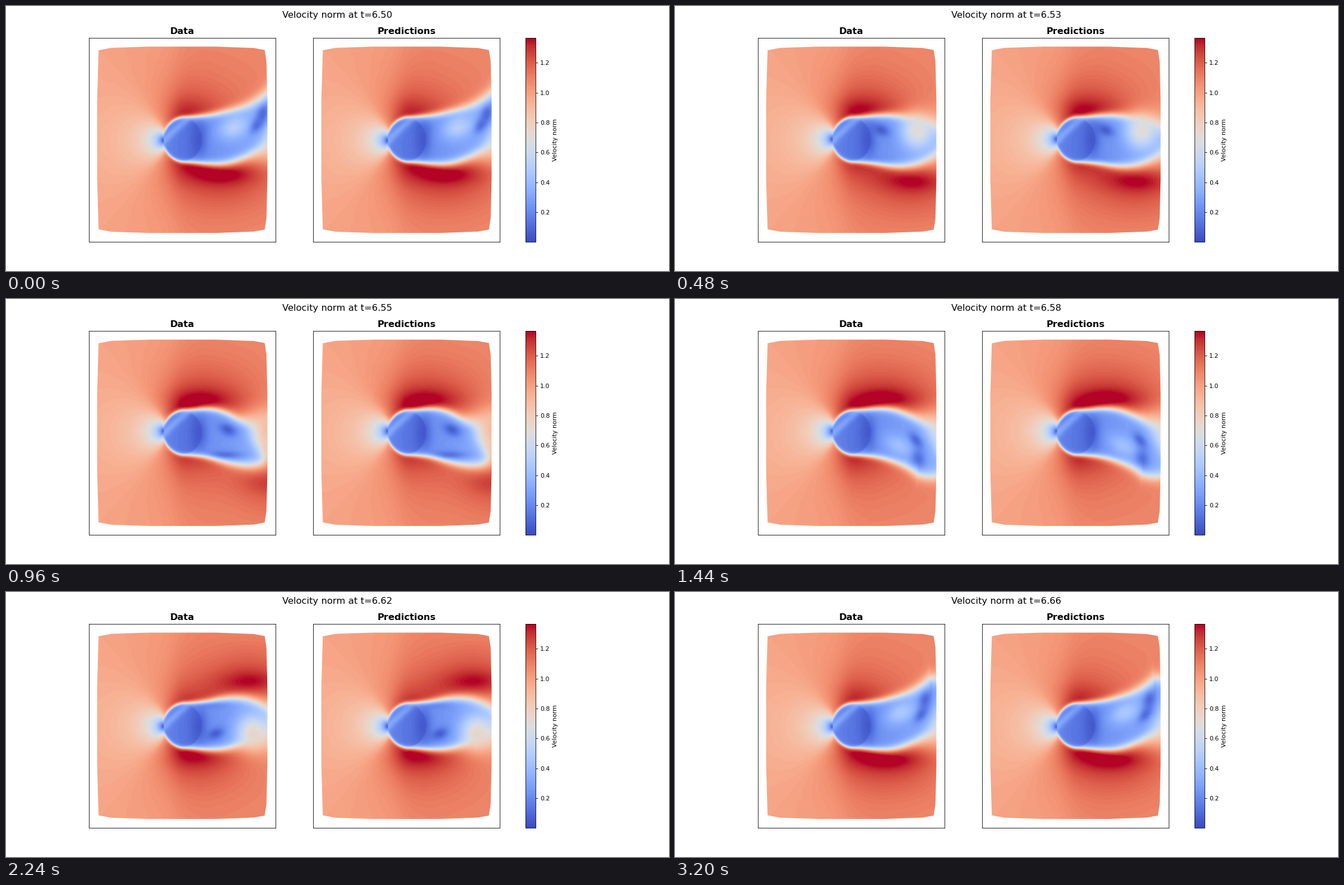
Write a matplotlib script that moves like this. It is 1183x473 px and loops after 3.36 s.

```python
import numpy as np
import matplotlib.pyplot as plt
from matplotlib.animation import FuncAnimation
from matplotlib.cm import ScalarMappable
from matplotlib.colors import Normalize
from matplotlib.patches import Polygon

W, H, DPI = 1183, 473, 1183 / 15
FRAMES, STEP_MS = 21, 160
PERIOD = 20.6           # shedding period, in frames
HALF = PERIOD / 2
MID_Y = 238.8           # wake axis, in stage pixels

# Default subplot box, less the colorbar's share
LEFT, TOP, BOTTOM = 0.125 * W, 0.12 * H, 0.89 * H
RIGHT = LEFT + 0.775 * W * 0.8 / 2.2

# Pixel grid covering the meshed domain
X0, X1, Y0, Y1 = 162, 468, 72, 406
xs = np.arange(X0, X1) + 0.5
X, Y = np.meshgrid(xs, np.arange(Y0, Y1) + 0.5 - MID_Y)

UPPER = [(162.6, 170), (165.2, 79), (188, 74.7), (255, 72.5), (375, 72.5),
         (442, 75), (461.5, 78.5), (464.7, 98.5), (466.4, 168)]
DOMAIN = UPPER + [(x, 2 * MID_Y - y) for x, y in reversed(UPPER)]


def ramp(x, a, b):
    u = np.clip((x - a) / (b - a), 0, 1)
    return u * u * (3 - 2 * u)


def mix(a, b, w):
    return a + (b - a) * w


def ages(t, start, end):
    """Side and age of each living feature; they shed on alternating sides."""
    for k in range(-1, 3):
        if start < t - k * HALF < end:
            yield (-1) ** k, t - k * HALF


def blob(side, cx, cy, rx, ry, tilt=0.0):
    dx, dy = X - cx, side * Y - cy
    c, s = np.cos(tilt), np.sin(tilt)
    return np.exp(-((c * dx + s * dy) / rx) ** 2 - ((c * dy - s * dx) / ry) ** 2)


def edge(t):
    """Upper wake edge above the axis: a flapping wave growing downstream."""
    u = np.clip((xs - 345) / 121, 0, 1)
    p = (t - 6) / PERIOD % 1
    rise = 0.5 + 0.2 * u
    wave = np.where(p < rise, 2 * p / rise - 1, 1 - 2 * (p - rise) / (1 - rise))
    line = 40 + 6 * ramp(xs, 315, 400) - 27 * u ** 4 + 69 * u ** 2 * wave
    nose = 1 - ((320 - xs) / 39) ** 2
    nose = np.clip(40 * np.sign(nose) * np.sqrt(abs(nose)), -80, 40)
    line = np.where(xs < 320, nose, line)
    return line, np.hypot(1, np.clip(np.gradient(line), -2, 2))


def lobe(side, a):
    """Fast flow riding beside the wake."""
    cx, cy = 320 + 4 * a + 0.33 * a * a, -58 - 34 * ramp(a, 9, 18)
    rx = 30 + 40 * np.sin(np.pi * np.clip((a + 2) / 22, 0, 1))
    amp = 0.26 * ramp(a, -6, 13) * (1 - ramp(a, 14, 21))
    return amp * (0.45 * blob(side, cx, cy, rx, 21)
                  + 0.55 * blob(side, cx, cy, 1.3 * rx, 60))


def eye(side, a):
    """Slow vortex centre, crossing the axis as it leaves."""
    amp = 0.9 * ramp(a, -1, 2) * (1 - ramp(a, 10, 14.5))
    return amp * blob(side, 346 + 6 * a + 0.35 * a * a, -20 + 0.42 * a * a,
                      16, 10, 0.4 + 0.5 * ramp(a, 6, 9))


def strip(side, a):
    """Slow streak along the wake edge that turns upright downstream."""
    e = ramp(a, 6.5, 9.5)
    amp = 0.9 * ramp(a, 2, 5) * (1 - ramp(a, 10.5, 14))
    return amp * blob(side, 346 + 1.05 * a * a, 33 + 1.3 * a,
                      mix(34, 12, e), mix(8, 21, e), -0.3 * e)


def core(side, a):
    """Faster pocket between two vortices: its weight and speed."""
    amp = ramp(a, 6, 9) * (1 - ramp(a, 16, 19.5))
    grow = ramp(a, 9, 13.5)
    shape = blob(side, 392 + 0.75 * (a - 6) ** 2, 24 - 0.22 * (a - 7) ** 2,
                 28, mix(17, 30, grow), 0.5 * (1 - grow))
    return amp * shape, 0.42 + 0.066 * (a - 9)


def outer_flow(t):
    """Potential flow past the cylinder plus the lobes."""
    shift = -2.5 * np.sin(2 * np.pi * (t - 2) / PERIOD) * (1 - ramp(X, 281, 320))
    xi = (X - 315) / np.where(X < 315, 34, 90)
    eta = (Y - shift) / 38
    r4 = np.maximum(xi ** 2 + eta ** 2, 0.9) ** 2
    speed = np.hypot(1 - (xi ** 2 - eta ** 2) / r4, 2 * xi * eta / r4)
    gain = speed - 1.015 + 0.075 * ramp(X, 250, 360)
    fast = gain / (1 + 2 * np.maximum(gain, 0)) * mix(0.6, 1, ramp(X, 275, 325))
    field = 1 + np.where(gain > 0, fast, gain)
    for side, a in ages(t, -6, 21):
        field += lobe(side, a)
    return field


# Cylinder interior, bridged by flat facets, and the still water behind it
BODY = 1 - ramp(np.hypot((X - 315) / 34, Y / 38), 0.94, 1.04)
chord = ((X - 284) * 35 + (Y + 3) * 38) / np.hypot(35, 38)
BODY_SPEED = 0.19 - 0.1 * (X - 281) / 68 + 0.13 * np.exp(-((chord - 2) / 7) ** 2)
STILL = 0.85 * blob(1, 344, 0, 14, 31)
LAYER = np.interp(X, [281, 320, 466], [2.5, 4, 13])


def inner_flow(t):
    field = mix(0.23 + 0.09 * ramp(X, 350, 466), BODY_SPEED, BODY)
    field = mix(field, 0.04, STILL)
    for slow in (eye, strip):
        for side, a in ages(t, -1, 14.5):
            field = mix(field, 0.04, slow(side, a))
    return field


def velocity(n):
    t = n % PERIOD
    top, top_len = edge(t)
    low, low_len = edge(t + HALF)
    inside = (0.25 * (1 + np.tanh((Y + top) / top_len / LAYER))
              * (1 + np.tanh((low - Y) / low_len / LAYER)))
    field = mix(outer_flow(t), inner_flow(t), inside)
    for side, a in ages(t, 6, 19.5):
        weight, level = core(side, a)
        field = mix(field, level, weight)
    return np.clip(field, 0.001, 1.367)


fig, axes = plt.subplots(1, 2, dpi=DPI, facecolor="white",
                         figsize=((W + 0.01) / DPI, (H + 0.01) / DPI))
norm = Normalize(0.001, 1.367)
cmap = plt.get_cmap("coolwarm", 100)


def add_panel(ax, name):
    im = ax.imshow(velocity(0), cmap=cmap, norm=norm, aspect="auto",
                   interpolation="nearest", extent=(X0, X1, Y1, Y0))
    ax.set(xlim=(LEFT, RIGHT), ylim=(BOTTOM, TOP), xticks=[], yticks=[])
    im.set_clip_path(Polygon(DOMAIN, transform=ax.transData))
    ax.set_title(name, fontsize=15, fontweight="bold")
    return im


images = [add_panel(ax, name) for ax, name in zip(axes, ("Data", "Predictions"))]
fig.colorbar(ScalarMappable(norm, cmap), ax=list(axes), label="Velocity norm")
heading = fig.suptitle("", fontsize=15)


def draw(n):
    field = velocity(n)
    for im in images:
        im.set_data(field)
    heading.set_text(f"Velocity norm at t={6.504 + 0.008 * n:.2f}")
    return images + [heading]


anim = FuncAnimation(fig, draw, frames=FRAMES, interval=STEP_MS,
                     repeat=True, repeat_delay=0, blit=False)
plt.show()
```
